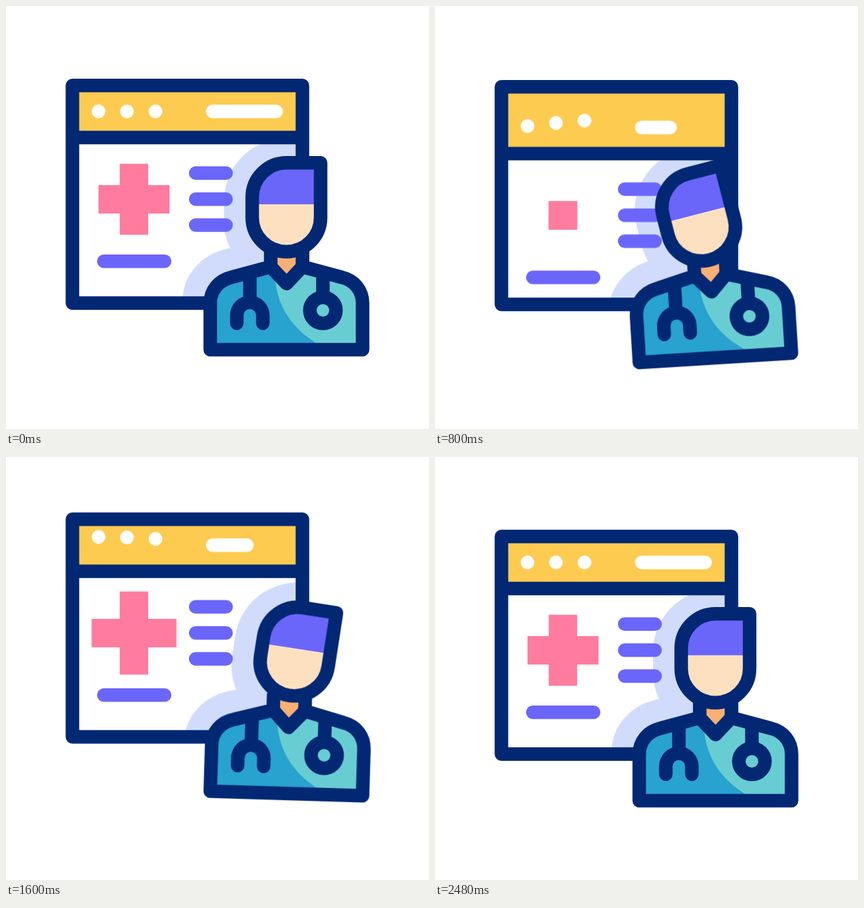
Write an HTML page that moves like this. It is 640x640 px and loops after 2640 ms.

```html
<!DOCTYPE html>
<html lang="en">
<head>
<meta charset="utf-8">
<title>Online doctor</title>
<style>
  html, body { margin: 0; width: 100%; height: 100%; overflow: hidden; background: #fff; }
  svg { display: block; width: 100%; height: 100%; }

  .line { fill: none; stroke: #022873; stroke-width: 20.5; stroke-linejoin: round; stroke-linecap: round; }
  .butt { stroke-linecap: butt; }
  .text { stroke: #6b66fa; }
  .shade { fill: #d1dcfd; }
  .white { fill: #fff; }
  .pink { fill: #ff7c9e; }

  .win, .header, .pill, .dot, .arm-x, .arm-y, .lift, .lean, .head {
    animation: 2640ms cubic-bezier(.37, 0, .63, 1) infinite;
  }
  .win { animation-name: win; }
  .header { animation-name: header; }
  .pill { animation-name: pill; }
  .dot { animation-name: dot; }
  .dot:nth-of-type(2) { animation-delay: 60ms; }
  .dot:nth-of-type(3) { animation-delay: 120ms; }
  .arm-x { animation-name: arm-x; transform-origin: 193.6px 292.5px; }
  .arm-y { animation-name: arm-y; transform-origin: 193.6px 292.5px; }
  .lift { animation-name: lift; }
  .lean { animation-name: lean; transform-origin: 424.5px 520px; }
  .head { animation-name: head; transform-origin: 424.5px 369px; }

  @keyframes win {
    0%, 4.55%, 92.42%, 100% { transform: translateY(0); }
    31.06% { transform: translateY(2px); animation-timing-function: cubic-bezier(.55, 0, .65, 1); }
    57.95% { transform: translateY(-26.5px); }
  }
  @keyframes header {
    0%, 4.55%, 59.09%, 100% { transform: translateY(0); }
    35.6% { transform: translateY(24px); }
  }
  @keyframes pill {
    0%, 4.55%, 81.82%, 100% { width: 116.5px; }
    26.52% { width: 55.5px; }
    44.7% { width: 132.5px; }
    62.88% { width: 70px; }
  }
  @keyframes dot {
    0%, 4.55%, 78.03%, 100% { transform: translateY(0); }
    21.97% { transform: translateY(-13px); }
    40.53% { transform: translateY(12.8px); }
    60.61% { transform: translateY(-12.4px); }
  }
  @keyframes arm-x {
    0%, 4.55%, 79.55%, 100% { transform: scaleX(1); }
    30.3% { transform: scaleX(.402); }
    54.17% { transform: scaleX(1.229); }
  }
  @keyframes arm-y {
    0%, 4.55%, 79.55%, 100% { transform: scaleY(1); }
    30.3% { transform: scaleY(.402); }
    54.17% { transform: scaleY(1.2); }
  }
  @keyframes lift {
    0%, 4.55%, 79.55%, 100% { transform: translateY(0); }
    28.41% { transform: translateY(12.6px); }
    53.79% { transform: translateY(-13px); }
  }
  @keyframes lean {
    0%, 4.55%, 75%, 100% { transform: rotate(0deg); }
    25% { transform: rotate(-4.6deg); }
    46.97% { transform: rotate(3.3deg); }
  }
  @keyframes head {
    0%, 4.55%, 81.82%, 100% { transform: rotate(0deg); }
    26.89% { transform: rotate(-12.3deg); }
    48.48% { transform: rotate(10deg); }
  }
</style>
</head>
<body>
<svg viewBox="0 0 640 640">
  <defs>
    <clipPath id="pane"><rect class="win" x="100.5" y="120.3" width="348" height="329"/></clipPath>
  </defs>

  <!-- Shadow of the doctor on the page -->
  <g clip-path="url(#pane)">
    <g class="lift"><g class="lean">
      <path class="shade" d="M267 560V447C267 408 295 374 340 366L420 345H580V560Z"/>
      <path class="shade head" d="M330 326V294.5A94.5 94.5 0 0 1 424.5 200H519V326A94.5 94.5 0 0 1 330 326Z"/>
    </g></g>
  </g>

  <!-- Browser window -->
  <g class="win">
    <clipPath id="inner"><rect x="100.5" y="120.3" width="348" height="329"/></clipPath>
    <g clip-path="url(#inner)">
      <g class="header">
        <rect x="100.5" y="60" width="348" height="139" fill="#fdcb50"/>
        <path class="line" d="M100.5 199H448.5"/>
      </g>
    </g>
    <rect class="line" x="100.5" y="120.3" width="348" height="329.2"/>
    <g class="header">
      <circle class="white dot" cx="140" cy="159.5" r="10.4"/>
      <circle class="white dot" cx="183" cy="159.5" r="10.4"/>
      <circle class="white dot" cx="226.2" cy="159.5" r="10.4"/>
      <rect class="white pill" x="302.5" y="149.2" width="116.5" height="20.6" rx="10.3"/>
      <rect class="pink arm-x" x="139.9" y="271" width="107.5" height="43"/>
      <rect class="pink arm-y" x="172.1" y="238.7" width="43" height="107.5"/>
      <path class="line text" d="M287 252.7H333M287 292.2H333M287 331.5H333M148 386.2H240"/>
    </g>
  </g>

  <!-- Doctor -->
  <g class="lift"><g class="lean">
    <path fill="#f9b072" d="M400.5 365H448.5V394.5L424.5 420L400.5 394.5Z"/>
    <path fill="#68cdd3" d="M309 520V450C309 430 322 415 341 410.5L400.5 394.5L424.5 420L448.5 394.5L508 410.5C527 415 539.5 430 539.5 450V520Z"/>
    <path fill="#28a2ce" d="M309 520V450C309 430 322 415 341 410.5L400.5 394.5L406 400C408 450 428 490 487 520Z"/>
    <path class="line butt" d="M400.5 369V394.5L341 410.5C322 415 309 430 309 450V520H539.5V450C539.5 430 527 415 508 410.5L448.5 394.5V369"/>
    <path class="line" d="M400.5 394.5L424.5 420L448.5 394.5"/>
    <path class="line" d="M369 410V448M349.2 480V468A19.7 19.7 0 0 1 388.6 468V480M479.5 410V440"/>
    <circle class="line" cx="479.5" cy="460.5" r="19.8"/>
    <g class="head">
      <path fill="#fde0bf" d="M372.5 295H476V320A51.75 51.75 0 0 1 372.5 320Z"/>
      <path fill="#6b66fa" d="M476 237.3H424.5A52 52 0 0 0 372.5 289.3V300H476Z"/>
      <path class="line" d="M476 237.3H424.5A52 52 0 0 0 372.5 289.3V320A51.75 51.75 0 0 0 476 320Z"/>
    </g>
  </g></g>
</svg>
</body>
</html>
```
